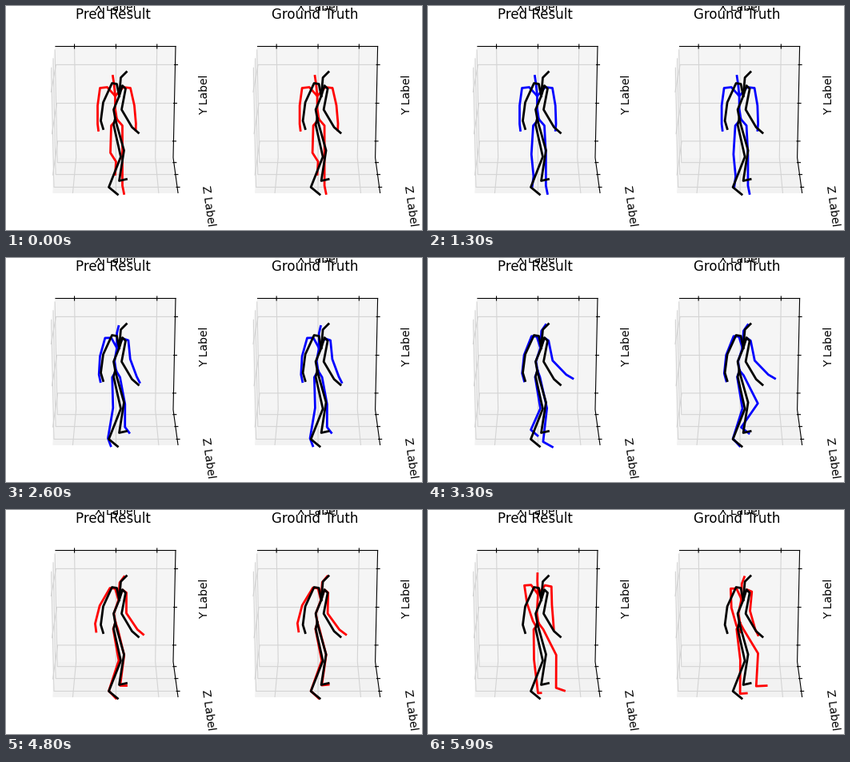
A matplotlib script for the animation above (6000 ms loop, 520 by 280 pixels).

```python
import numpy as np
import matplotlib.pyplot as plt
from matplotlib.animation import FuncAnimation

W, H, DPI = 520, 280, 100
FRAMES, INTERVAL = 60, 100
STRIDE = 1600                    # length of one walk cycle in ms


def points(*p):
    return np.array(p, float)


# body: root, spine, chest, neck, head
# arm: collar, shoulder, elbow, wrist, hand; leg: hip, knee, ankle, toe
GOAL = dict(
    body=points((136, 140), (134, 129), (141, 112), (143, 89), (150, 82)),
    arm_l=points((138, 97), (132, 96), (121, 120), (118, 143), (121, 153)),
    arm_r=points((145, 99), (149, 103), (144, 129), (157, 151), (165, 158)),
    leg_l=points((134, 148), (143, 188), (128, 226), (139, 235)),
    leg_r=points((138, 148), (147, 180), (141, 218), (150, 216)))


def front_pose():
    """Symmetric figure that faces the camera."""
    arm = points((10, 101), (19, 102), (22, 124), (22, 147), (21, 155))
    leg = points((7, 149), (10, 186), (10, 224), (12, 234))
    left, right = (-1, 1), (1, 1)
    return dict(
        body=points((138, 141), (136, 128), (136, 112), (134.5, 97), (133, 87)),
        arm_l=arm * left + (136, 0), arm_r=arm * right + (136, 0),
        leg_l=leg * left + (138, 0), leg_r=leg * right + (138, 0))


FRONT = front_pose()

# Leg offsets for the raised foot of the walk and for the closing step.
LIFT = points((0, 0), (2, -3), (9, -30), (10, -24))
STEP_R = points((0, 0), (12, -4), (13, -1), (20, -5))
STEP_L = points((0, 0), (1, 0), (9, 4), (12, -6))

# turn_end: how far the figure still faces sideways at the end;
# slip: leg offsets while it walks sideways.
PANELS = [
    dict(title="Pred Result", x=0, title_x=134, turn_end=0.2, rise=7,
         slip=dict(leg_l=points((0, 0), (0, 0), (0, -11), (0, -13)),
                   leg_r=points((0, 0), (1, 6), (1, 10), (5, 16)))),
    dict(title="Ground Truth", x=252.6, title_x=386, turn_end=0.55, rise=1,
         slip=dict(leg_r=points((2, -2), (12, 0), (-4, -8), (-2, -1)))),
]


def lerp(a, b, f):
    return a + (b - a) * f


def glide(time, times, values):
    """Smooth steps from value to value."""
    i = int(np.clip(np.searchsorted(times, time) - 1, 0, len(times) - 2))
    u = np.clip((time - times[i]) / (times[i + 1] - times[i]), 0, 1)
    return lerp(values[i], values[i + 1], u * u * (3 - 2 * u))


def swing_arm(arm, degrees):
    """Rotate the arm about its shoulder; positive moves the hand right."""
    c, s = np.cos(np.radians(degrees)), np.sin(np.radians(degrees))
    shoulder = arm[1]
    arm[2:] = shoulder + (arm[2:] - shoulder) @ np.array([[c, -s], [s, c]])


def pose_at(time, panel):
    turn = np.interp(time, [1800, 3400, 4500, 5900], [0, 0.85, 1, panel["turn_end"]])
    pose = {limb: lerp(FRONT[limb], GOAL[limb], turn) for limb in GOAL}

    walk = glide(time, [1800, 3400], [1, 0]) * np.cos(2 * np.pi * time / STRIDE)
    for limb, s in (("leg_l", walk), ("leg_r", -walk)):
        pose[limb] += LIFT * max(s, 0)
        pose[limb][1:, 0] += 3 * min(s, 0)

    sideways = glide(time, [2700, 3300, 4100, 4500], [0, 1, 1, 0])
    for limb, offset in panel["slip"].items():
        pose[limb] += offset * sideways

    ending = glide(time, [4800, 5900], [0, 1])
    pose["leg_l"] += STEP_L * ending
    pose["leg_r"] += STEP_R * ending
    for part in (pose["body"][2:], pose["arm_l"], pose["arm_r"]):
        part[:, 1] -= panel["rise"] * ending

    beats = [2000, 3300, 4100, 4800, 5900]
    swing_arm(pose["arm_l"], glide(time, beats, [0, 0, 8, -8, 20]))
    swing_arm(pose["arm_r"], glide(time, beats, [0, 19, -8, 8, -2]) + 5 * walk)
    return pose


def chains(pose):
    """Attach arms to the chest and legs to the root."""
    body = pose["body"]
    yield body
    for limb in ("arm_l", "arm_r", "leg_l", "leg_r"):
        start = body[2] if limb.startswith("arm") else body[0]
        yield np.vstack([start, pose[limb]])


fig = plt.figure(figsize=(W / DPI, H / DPI), dpi=DPI, facecolor="white")
ax = fig.add_axes([0, 0, 1, 1])
ax.set_xlim(0, W)
ax.set_ylim(H, 0)
ax.axis("off")

# Corners of the box: far wall, then the near edge of the left wall and floor.
FAR_TL, FAR_TR, FAR_BL, FAR_BR = points((62, 50.5), (212, 50.5), (65, 189.5), (209, 189.5))
NEAR_TL, NEAR_BL, NEAR_BR = points((55.8, 82.5), (59, 233.5), (215, 233.5))


def path(pts, dx, color, width, z):
    x, y = np.transpose(pts)
    return ax.plot(x + dx, y, color=color, lw=width, zorder=z, snap=False)[0]


def label(x, y, text, size, angle=0):
    ax.text(x, y, text, size=size, family="DejaVu Sans", rotation=angle,
            rotation_mode="anchor", ha="center", va="baseline", zorder=6)


def draw_box(dx):
    for corners, shade in (((FAR_TL, FAR_BL, NEAR_BL, NEAR_TL), "#f9f9f9"),
                           ((FAR_BL, FAR_BR, NEAR_BR, NEAR_BL), "#f2f2f2"),
                           ((FAR_TL, FAR_TR, FAR_BR, FAR_BL), "#f5f5f5")):
        x, y = np.transpose(corners)
        ax.fill(x + dx, y, color=shade, lw=0.8, zorder=1)

    def grid(*pts):
        path(pts, dx, "#d4d4d4", 0.8, 2)

    def tick(x, y, w, h):
        path([(x, y), (x + w, y + h)], dx, "black", 0.8, 3)

    for f in (0.157, 0.503, 0.845):
        top = lerp(FAR_TL, FAR_TR, f)
        grid(top, lerp(FAR_BL, FAR_BR, f), lerp(NEAR_BL, NEAR_BR, f))
        tick(top[0], 48, 0, 5)
    for f in (0.165, 0.511, 0.852):
        right = lerp(FAR_TR, FAR_BR, f)
        grid(lerp(NEAR_TL, NEAR_BL, f), lerp(FAR_TL, FAR_BL, f), right)
        tick(right[0] - 1, right[1], 4, 0)
    for f in (0.14, 0.48, 0.84):
        right = lerp(FAR_BR, NEAR_BR, f)
        grid(lerp(FAR_TL, NEAR_TL, f), lerp(FAR_BL, NEAR_BL, f), right)
        tick(right[0] - 1, right[1], 4, 0)
    path([FAR_TL, FAR_TR], dx, "black", 0.8, 3)
    path([FAR_TR, FAR_BR, NEAR_BR], dx, "black", 0.8, 3)

    label(137 + dx, 6.5, "X Label", 10)
    label(252 + dx, 111, "Y Label", 10, 90)
    label(249 + dx, 250.7, "Z Label", 10, -82)


movers = []
for panel in PANELS:
    dx = panel["x"]
    draw_box(dx)
    label(panel["title_x"], 16, panel["title"], 12)
    movers.append([path(c, dx, "red", 2, 4) for c in chains(GOAL)])
    for c in chains(GOAL):
        path(c + 0.5, dx, "black", 2, 5)


def update(frame):
    time = frame * INTERVAL
    color = "blue" if 1000 <= time < 4500 else "red"
    for panel, lines in zip(PANELS, movers):
        for line, c in zip(lines, chains(pose_at(time, panel))):
            line.set_data(c[:, 0] + panel["x"] + 0.5, c[:, 1] + 0.5)
            line.set_color(color)
    return sum(movers, [])


anim = FuncAnimation(fig, update, frames=FRAMES, interval=INTERVAL, repeat=True)
plt.show()
```
